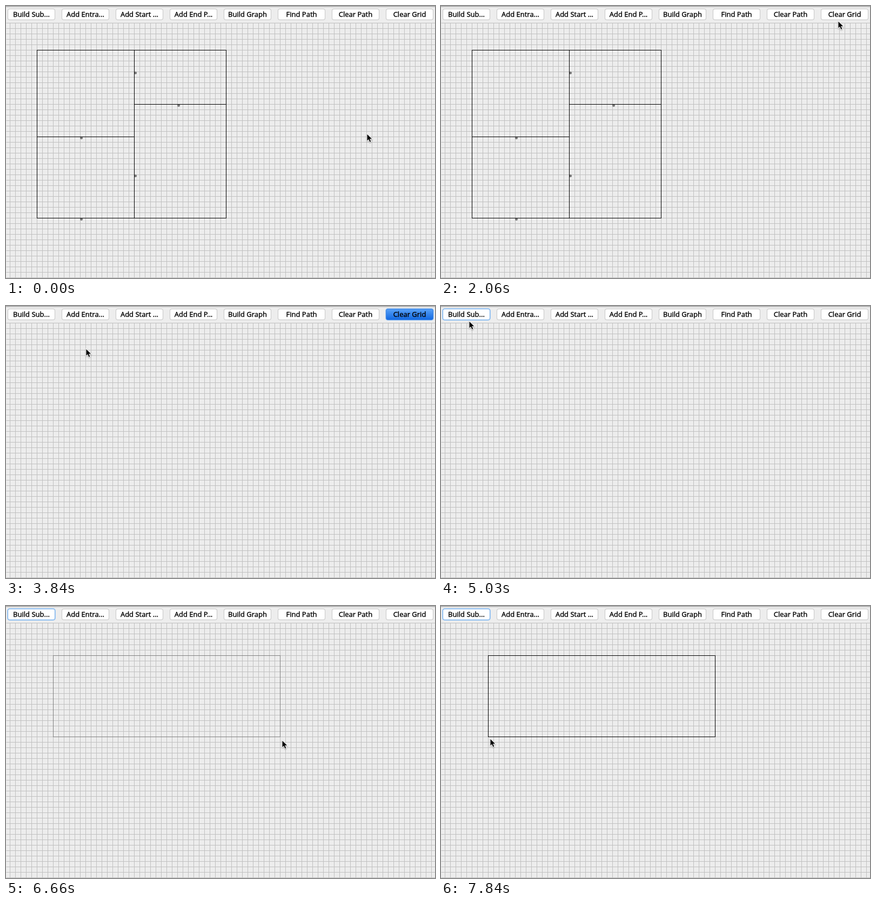
Animation of 794 by 502 pixels, one loop 8 s. Source, as an HTML page with a canvas:

```html
<!DOCTYPE html>
<html>
<head>
<meta charset="utf-8">
<style>
html, body { margin: 0; width: 794px; height: 502px; overflow: hidden; background: #ededed; }
canvas { display: block; }
</style>
</head>
<body>
<canvas id="stage" width="794" height="502"></canvas>
<script>
const ctx = document.getElementById('stage').getContext('2d');
const LOOP = 8000, STEP = 148, CELL = 10;
const labels = ['Build Sub...', 'Add Entra...', 'Add Start ...', 'Add End P...',
  'Build Graph', 'Find Path', 'Clear Path', 'Clear Grid'];

// Clock steps at which the state changes
const PRESS = 19, CLEAR = 20, FOCUS = 34, DRAG = 42, DROP = 46;

// Pointer moves: first step, last step, x and y reached; it rests in between
const moves = [
  [3, 8, 700, 96], [9, 10, 706, 79], [10, 15, 742, 15], [22, 24, 248, 133],
  [25, 26, 148, 79], [26, 30, 50, 11], [33, 34, 52, 28], [34, 39, 112, 188],
  [39, 41, 89, 95], [41, 45, 511, 248], [45, 49, 134, 246], [49, 53, 91, 245]
];

function pointer(step) {
  let x = 668, y = 236;
  for (const [from, to, toX, toY] of moves) {
    const part = Math.max(0, Math.min(1, (step - from) / (to - from)));
    x += (toX - x) * part;
    y += (toY - y) * part;
  }
  return [Math.round(x), Math.round(y)];
}

function rect(x, y, x2, y2, color) {
  ctx.strokeStyle = color;
  ctx.strokeRect(x + .5, y + .5, x2 - x, y2 - y);
}

function line(x, y, x2, y2) {
  ctx.beginPath();
  ctx.moveTo(x + .5, y + .5);
  ctx.lineTo(x2 + .5, y2 + .5);
  ctx.stroke();
}

function rounded(x, y, w, h, r, fill) {
  ctx.beginPath();
  ctx.roundRect(x, y, w, h, r);
  ctx.fillStyle = fill;
  ctx.fill();
}

function button(label, x, pressed, focused) {
  if (pressed || focused) rounded(x - 1, 4, 90, 23, 5, '#acd0f5');
  rounded(x, 5, 88, 21, 4, pressed ? '#3d82e0' : focused ? '#79afe9' : '#c6c6c6');
  const face = ctx.createLinearGradient(0, 6, 0, 25);
  face.addColorStop(0, pressed ? '#559ff7' : '#fff');
  face.addColorStop(1, pressed ? '#146ae2' : '#fff');
  rounded(x + 1, 6, 86, 19, 3, face);
  ctx.fillStyle = ctx.strokeStyle = '#000';
  ctx.lineWidth = .4;
  ctx.fillText(label, x + 44, 20);
  ctx.strokeText(label, x + 44, 20);
  ctx.lineWidth = 1;
}

function grid() {
  ctx.strokeStyle = '#c0c0c0';
  for (let x = 7; x < 794; x += CELL) line(x, 31, x, 502);
  for (let y = 31; y < 502; y += CELL) line(0, y, 794, y);
}

function rooms() {
  ctx.fillStyle = '#777';
  for (const [x, y] of [[239, 123], [319, 183], [139, 243], [239, 313], [139, 393]]) {
    ctx.beginPath();
    ctx.arc(x + .5, y + .5, 2.5, 0, 7);
    ctx.fill();
  }
  rect(57, 81, 407, 391, '#000');
  line(237, 81, 237, 391);
  line(237, 181, 407, 181);
  line(57, 241, 237, 241);
}

const arrow = new Path2D('M.5 .7V12.6L3.3 9.9 5.4 15 7.3 14.2 5.2 9.3H9.2Z');

function cursor(x, y) {
  ctx.save();
  ctx.translate(x, y);
  ctx.shadowColor = 'rgba(0,0,0,.35)';
  ctx.shadowBlur = 2;
  ctx.shadowOffsetY = 1;
  ctx.strokeStyle = '#fff';
  ctx.lineWidth = 1.8;
  ctx.stroke(arrow);
  ctx.shadowColor = 'transparent';
  ctx.fillStyle = '#000';
  ctx.fill(arrow);
  ctx.restore();
}

function draw(t) {
  const step = Math.floor((t + 12) / STEP);
  const [x, y] = pointer(step);
  const snap = (v, origin) => origin + Math.floor((v - origin) / CELL) * CELL;
  ctx.lineWidth = 1;
  ctx.fillStyle = '#ededed';
  ctx.fillRect(0, 0, 794, 502);
  ctx.fillStyle = '#b8b8b8';
  ctx.fillRect(0, 0, 794, 2);
  grid();
  if (step < CLEAR) rooms();
  if (step >= DROP) rect(87, 91, 507, 241, '#000');
  else if (step >= DRAG) rect(87, 91, snap(x, 7), snap(y, 1), '#808080');

  ctx.font = '13px "Open Sans", "Noto Sans", sans-serif';
  ctx.textAlign = 'center';
  labels.forEach((label, i) => button(label, 3 + i * 100,
    i === 7 && step >= PRESS && step < FOCUS,
    i === 0 && step >= FOCUS));
  cursor(x, y);
}

const begin = performance.now();
function tick() {
  draw((performance.now() - begin) % LOOP);
  requestAnimationFrame(tick);
}
tick();
</script>
</body>
</html>
```
